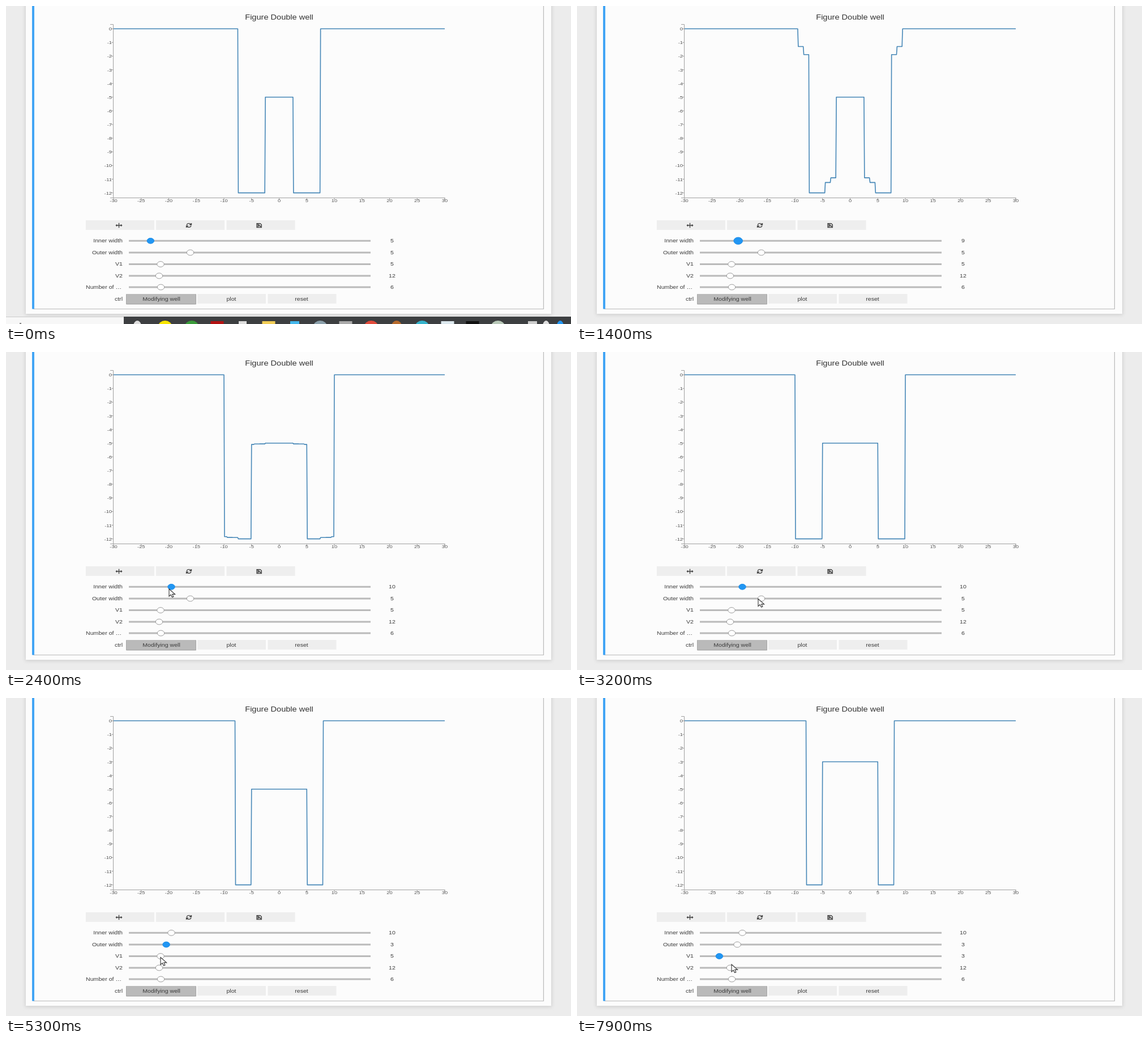
An HTML page that plays this animation: 998x561 px, repeating every 8000 ms.

```html
<!DOCTYPE html>
<html lang="en">
<head>
<meta charset="utf-8">
<title>Double well</title>
<style>
  html, body { margin: 0; width: 100%; height: 100%; overflow: hidden; background: #ececec; }
  svg { display: block; width: 998px; height: 561px; }
  text { font-family: "Liberation Sans", Arial, sans-serif; font-size: 9.1px; fill: #3c3c3c; }
  .title { font-size: 12.5px; fill: #333; }
  .tick { font-size: 8px; fill: #555; }
  .axis { stroke: #a0a0a0; fill: none; }
  .btn { fill: #eee; }
  .track { stroke: #bababa; stroke-width: 3; }
  .knob { fill: #fff; stroke: #9c9c9c; }
  .knob.on { fill: #2196f3; stroke: #1e8ce6; }
  .icon { fill: none; stroke: #444; stroke-width: 1.4; }
  #curve { fill: none; stroke: #4687b7; stroke-width: 1.6; stroke-linejoin: round; }
</style>
</head>
<body>
<svg id="stage" viewBox="0 0 998 561">
  <defs>
    <filter id="soft" x="-10%" y="-10%" width="120%" height="120%"><feGaussianBlur stdDeviation="3"/></filter>
  </defs>
  <rect width="998" height="561" fill="#ececec"/>
  <rect x="34" y="-20" width="930" height="565" fill="#cfcfcf" filter="url(#soft)"/>
  <rect x="35" y="-20" width="928" height="563" fill="#fcfcfc"/>
  <path d="M949.5 0V534.5H48" fill="none" stroke="#b9b9b9" stroke-width="1.2"/>
  <rect x="46" width="4" height="534.5" fill="#42a5f5"/>
  <g id="static"></g>
  <path id="curve"/>
  <g id="sliders"></g>
  <g id="taskbar"></g>
  <path id="cursor" d="M0 0V13L3.2 10.2L5.5 14.6L7.9 13.6L5.8 9.4H10.6Z" fill="#fff" stroke="#333" stroke-width="1.1"/>
</svg>
<script>
const LOOP = 8000, FRAME = 100, FADE = 1000;
const $ = id => document.getElementById(id);

function add(parent, tag, attrs, content) {
  const el = document.createElementNS("http://www.w3.org/2000/svg", tag);
  for (const k in attrs) el.setAttribute(k, attrs[k]);
  if (content !== undefined) el.textContent = content;
  parent.appendChild(el);
  return el;
}

// The whole screen is widened, so all lettering shares one aspect ratio.
function label(parent, x, y, str, anchor = "middle", cls = "") {
  return add(parent, "text", {
    transform: `translate(${x} ${y}) scale(1.165 1)`, "text-anchor": anchor, class: cls
  }, str);
}

const px = x => 482.5 + 9.75 * x;
const py = y => 40.2 - 24.12 * y;
const base = $("static");

// Axes
label(base, 482.5, 24, "Figure Double well", "middle", "title");
add(base, "path", { class: "axis", d: "M184 32.5H189.5V338.5H775V343M189.5 338.5H184" });
for (let v = 0; v >= -12; v--) {
  add(base, "path", { class: "axis", d: `M186 ${py(v)}h4` });
  label(base, 187, py(v) + 3, v, "end", "tick");
}
for (let v = -30; v <= 30; v += 5) {
  add(base, "path", { class: "axis", d: `M${px(v)} 338v4` });
  label(base, px(v), 345.5, v, "middle", "tick");
}

// Buttons
const button = (x, y, w = 121) => add(base, "rect", { class: "btn", x, y, width: w, height: 17 });
[141, 265, 389.5].forEach(x => button(x, 378));
const icon = d => add(base, "path", { class: "icon", d });
icon("M194.5 387H204.5M199.5 382.8V391.2M196 385.6L194.5 387L196 388.4M203 385.6L204.5 387L203 388.4");
icon("M319 386.5Q320 383.6 323 383.6T326.5 385.5M327.5 383V386H324M327 387.8Q326 390.4 323 390.4T319.6 388.6M318.6 391V388H322");
icon("M443 383.7H449L451.3 385.7V390.6H443ZM445 384V386.3H448M445 390V388H449.5V390");

add(base, "rect", { x: 212, y: 508, width: 124, height: 18.5, rx: 1, fill: "#a8a8a8" });
add(base, "rect", { x: 213, y: 508, width: 122, height: 17, fill: "#bababa" });
[338, 462.5].forEach(x => button(x, 508));
label(base, 206, 520, "ctrl", "end");
label(base, 274.5, 520, "Modifying well");
label(base, 398, 520, "plot");
label(base, 522, 520, "reset");

// Sliders: knob position at the starting value, and pixels per unit
const sliders = [
  { name: "Inner width", y: 414.3, x: 255.3, unit: 7.35, value: 5 },
  { name: "Outer width", y: 435, x: 325.5, unit: 21.2, value: 5 },
  { name: "V1", y: 455.5, x: 273, unit: 10.8, value: 5 },
  { name: "V2", y: 476, x: 270.5, unit: 4.4, value: 12 },
  { name: "Number of \u2026", y: 496, x: 273.5, unit: 11, value: 6 }
];
for (const s of sliders) {
  const g = $("sliders");
  label(g, s.name.startsWith("Num") ? 204 : 206, s.y + 2.7, s.name, "end");
  add(g, "path", { class: "track", d: `M217 ${s.y}H644` });
  s.knob = add(g, "ellipse", { class: "knob", cy: s.y });
  s.text = label(g, 682, s.y + 2.9, s.value);
}

// Taskbar
const bar = $("taskbar");
add(bar, "rect", { y: 548, width: 208, height: 13, fill: "#f7f7f7" });
add(bar, "path", { d: "M0 548.5H208", stroke: "#ccc" });
add(bar, "rect", { x: 24, y: 559, width: 3, height: 2, fill: "#888" });
add(bar, "rect", { x: 208, y: 548, width: 790, height: 13, fill: "#3d3f41" });
const dot = (x, fill, r = 12) => add(bar, "ellipse", { cx: x, cy: 565, rx: r, ry: 10, fill });
const tile = (x, fill, w = 23) => add(bar, "rect", { x: x - w / 2, y: 556, width: w, height: 5, fill });
dot(232, "#ddd", 7); dot(281, "#f8e500"); dot(328, "#3a9b3a"); tile(373, "#b31212");
tile(418, "#ddd", 14); tile(464, "#f1cc55"); tile(510, "#43b7ec", 16); dot(555, "#8ba0ab");
tile(600, "#aaa"); dot(645, "#e24b3b"); dot(690, "#b76a2c", 9); dot(735, "#35b3cc");
tile(780, "#dce8ee"); tile(824, "#111"); dot(869, "#b8c8b8");
tile(930, "#ccc", 16); dot(954, "#ddd", 6); dot(979, "#2196f3", 6);

// [time, slider, value]
const moves = [
  [400, 0, 6], [700, 0, 7], [1020, 0, 8], [1080, 0, 9], [1500, 0, 10],
  [3800, 1, 4], [4100, 1, 3],
  [6400, 2, 4], [6600, 2, 3]
];
// Redraws of the well: [time, inner, outer, V1, V2]
const wells = [
  [850, 7, 5, 5, 12], [1090, 8, 5, 5, 12], [1100, 9, 5, 5, 12], [1550, 10, 5, 5, 12],
  [3900, 10, 4, 5, 12], [4180, 10, 3, 5, 12],
  [6600, 10, 3, 4, 12], [6720, 10, 3, 3, 12]
];
// Pointer stops: [time, x, y]
const path = [
  [1600, 288, 418], [2500, 288, 418], [3100, 320, 435.5], [3600, 320, 435.5], [4200, 279, 436],
  [4600, 279, 436], [5100, 273, 457.5], [6200, 273, 457.5], [6700, 253, 456], [7300, 253, 456],
  [7800, 273, 470], [8000, 273, 470]
];

const ease = p => p < 0.5 ? 4 * p ** 3 : 1 - 4 * (1 - p) ** 3;

// Samples are tenths of a unit, so i / 10 is the coordinate.
function depth(i, inner, outer, v1, v2) {
  const d = Math.abs(i), edge = inner * 5;
  return d <= edge ? -v1 : d < edge + outer * 10 ? -v2 : 0;
}

// Each redraw starts from wherever the previous one had got to.
function curveAt(t) {
  const live = wells.filter(w => w[0] <= t).map(([start, ...shape], k) => {
    const end = k + 1 < wells.length ? Math.min(t, wells[k + 1][0]) : t;
    return { shape, mix: ease(Math.min(1, (end - start) / FADE)) };
  });
  let d = "", last, skipped = "";
  for (let i = -300; i <= 300; i++) {
    let y = depth(i, 5, 5, 5, 12);
    for (const { shape, mix } of live) y += (depth(i, ...shape) - y) * mix;
    const point = `${px(i / 10).toFixed(2)} ${py(y).toFixed(2)}`;
    if (y === last && i < 300) { skipped = point; continue; }
    if (skipped) d += "L" + skipped;
    d += (d ? "L" : "M") + point;
    skipped = "";
    last = y;
  }
  return d;
}

function pointerAt(t) {
  const k = path.findIndex(p => p[0] > t);
  if (k < 1) return null;
  const [a, b] = [path[k - 1], path[k]];
  const p = (t - a[0]) / (b[0] - a[0]), e = p * p * (3 - 2 * p);
  return [a[1] + (b[1] - a[1]) * e, a[2] + (b[2] - a[2]) * e];
}

function draw(t) {
  $("curve").setAttribute("d", curveAt(t));
  const active = t < 3500 ? 0 : t < 6000 ? 1 : 2;
  const held = t >= 200 && t < 1600 || t >= 3500 && t < 4400 || t >= 6000 && t < 7200;
  sliders.forEach((s, n) => {
    const value = moves.reduce((v, m) => m[1] === n && m[0] <= t ? m[2] : v, s.value);
    const on = n === active, big = on && held;
    s.knob.setAttribute("cx", s.x + (value - s.value) * s.unit);
    s.knob.setAttribute("rx", big ? 7.8 : 6.2);
    s.knob.setAttribute("ry", big ? 6.2 : 4.9);
    s.knob.setAttribute("class", on ? "knob on" : "knob");
    s.text.textContent = value;
  });
  $("taskbar").style.display = t < 200 ? "" : "none";
  const at = pointerAt(t);
  $("cursor").style.display = at ? "" : "none";
  if (at) $("cursor").setAttribute("transform", `translate(${at[0]} ${at[1]})`);
}

const begin = performance.now();
function tick() {
  const t = (performance.now() - begin) % LOOP;
  draw(Math.floor(t / FRAME) * FRAME);
  requestAnimationFrame(tick);
}
tick();
</script>
</body>
</html>
```
